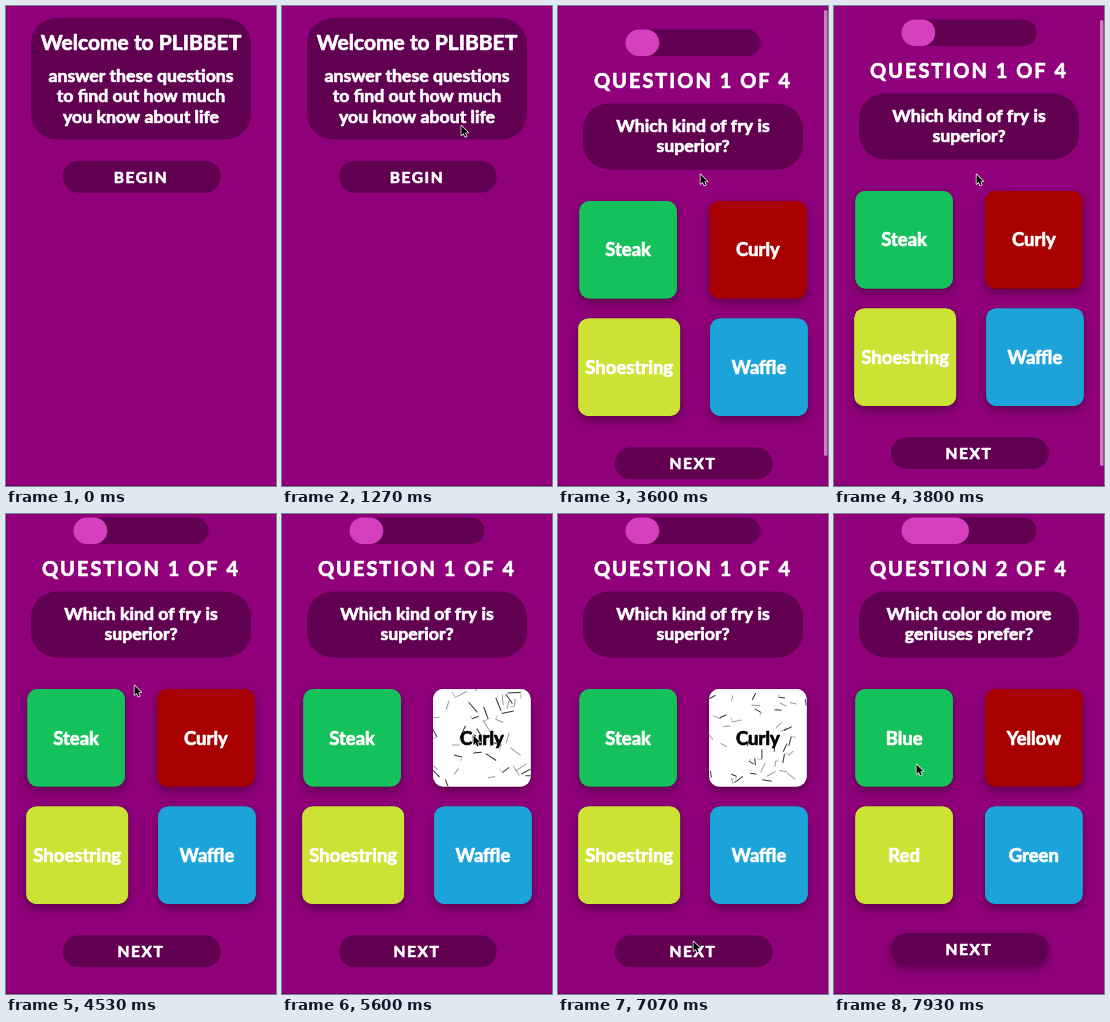
Animation of 270x480 px, one loop 8 s. Source, as an HTML page with a canvas:

```html
<!DOCTYPE html>
<html lang="en">
<head>
<meta charset="utf-8">
<title>Quiz</title>
<style>
  html, body { margin: 0; width: 100%; height: 100%; overflow: hidden; background: #8f007a; }
  canvas { display: block; width: 270px; height: 480px; }
</style>
</head>
<body>
<canvas id="stage" width="270" height="480"></canvas>
<script>
const ctx = document.getElementById('stage').getContext('2d');
const W = 270, H = 480, MID = W / 2, LOOP = 8000;
const BEGIN_CLICK = 2670, PICK = 5130, NEXT_CLICK = 7470;
const BG = '#8f007a', DARK = '#610050', PINK = '#d63fc0';
const COLORS = ['#14c15a', '#a80000', '#cce335', '#1ca4da'];
const CARD = 97.5, GRID = 259.5;

const QUESTIONS = [
  { lines: ['Which kind of fry is', 'superior?'],
    answers: ['Steak', 'Curly', 'Shoestring', 'Waffle'] },
  { lines: ['Which color do more', 'geniuses prefer?'],
    answers: ['Blue', 'Yellow', 'Red', 'Green'] }
];

const ENTER = { time: 600, x: 244, y: 33 };
const MOVES = [
  { from: 600, to: 1730, x: 142, y: 168 },
  { from: 4270, to: 4530, x: 128, y: 171 },
  { from: 4530, to: 5070, x: 191, y: 221 },
  { from: 6000, to: 6800, x: 135, y: 427 },
  { from: 7700, to: 7930, x: 82, y: 250 }
];

const clamp = v => Math.max(0, Math.min(1, v));
const ease = p => p * p * (3 - 2 * p);
const progress = (t, a, b) => ease(clamp((t - a) / (b - a)));
const mix = (a, b, p) => a + (b - a) * p;

function seeded(seed) {
  return () => (seed = (seed * 16807) % 2147483647) / 2147483647;
}

const rnd = seeded(4217);
const sticks = Array.from({ length: 44 }, () => ({
  x: rnd(), y: rnd(), angle: rnd() * Math.PI, spin: (rnd() - 0.5) * 2.4,
  fall: 0.1 + rnd() * 0.2, size: 7 + rnd() * 7,
  shade: rnd() < 0.5 ? '#333' : '#999', bent: rnd() < 0.4
}));

function box(x, y, w, h, r, color) {
  ctx.fillStyle = color;
  ctx.beginPath();
  ctx.roundRect(x, y, w, h, r);
  ctx.fill();
}

// A tight and a wide layer of shade
function raisedBox(x, y, w, h, r, color, strength = 1) {
  ctx.save();
  for (const k of [1, 2]) {
    ctx.shadowColor = `rgba(0,0,0,${0.2 * strength})`;
    ctx.shadowBlur = 6 * k;
    ctx.shadowOffsetY = 1 + 2 * k;
    box(x, y, w, h, r, color);
  }
  ctx.restore();
}

function setFont(size, gap = 0) {
  ctx.font = `bold ${size}px Lato, "Noto Sans", sans-serif`;
  ctx.letterSpacing = gap + 'px';
  ctx.textAlign = 'center';
}

// The outline thickens the strokes
function text(str, x, y, size, gap = 0, color = '#fff') {
  setFont(size, gap);
  ctx.fillStyle = ctx.strokeStyle = color;
  ctx.lineWidth = 0.7;
  ctx.lineJoin = 'round';
  ctx.strokeText(str, x, y);
  ctx.fillText(str, x, y);
}

function paragraph(lines, y) {
  lines.forEach((line, i) => text(line, MID, y + i * 20.4, 17.7));
}

function button(label, y, lift = 0) {
  raisedBox(57, y - 2 * lift, 157.5, 31.5, 15.75, DARK, lift);
  text(label, MID, y + 21.5 - 2 * lift, 15.5, 1.6);
}

function drawWelcome() {
  box(25, 12, 220, 121.5, 26, DARK);
  text('Welcome to PLIBBET', MID, 44, 21);
  paragraph(['answer these questions', 'to find out how much', 'you know about life'], 76);
  button('BEGIN', 155);
}

function drawSticks(x, y, w, h, t) {
  const s = (t - PICK) / 1000;
  const scale = mix(1, 0.75, progress(t, 5600, 7070));
  ctx.save();
  ctx.beginPath();
  ctx.roundRect(x, y, w, h, 10);
  ctx.clip();
  ctx.lineWidth = 1;
  const line = (x0, y0, x1, y1, color) => {
    ctx.strokeStyle = color;
    ctx.beginPath();
    ctx.moveTo(x0, y0);
    ctx.lineTo(x1, y1);
    ctx.stroke();
  };
  for (const k of sticks) {
    const half = k.size * scale / 2;
    ctx.save();
    ctx.translate(x + k.x * w, y - 10 + (k.y + k.fall * s) % 1 * (h + 20));
    ctx.rotate(k.angle + k.spin * s);
    line(-half, 0, half, 0, k.shade);
    if (k.bent) line(half, 0, half, half, '#bbb');
    ctx.restore();
  }
  ctx.restore();
}

function drawCard(label, x, y, w, color, picked, t) {
  raisedBox(x, y, w, CARD, 10, picked ? '#fff' : color);
  if (picked) drawSticks(x, y, w, CARD, t);
  text(label, x + w / 2, y + 55.5, 18.5, 0, picked ? '#000' : '#fff');
}

// Cards grow with their label; the free room goes around them evenly
function drawCards(answers, pick, t) {
  setFont(18.5);
  const widths = answers.map(a => Math.max(CARD, ctx.measureText(a).width + 14));
  for (let row = 0; row < 2; row++) {
    const first = row * 2;
    const margin = (GRID - widths[first] - widths[first + 1]) / 4;
    let x = (W - GRID) / 2 + margin;
    for (let i = first; i < first + 2; i++) {
      drawCard(answers[i], x, 195 + row * 117.5, widths[i], COLORS[i], i === pick, t);
      x += widths[i] + 2 * margin;
    }
  }
}

function drawQuestion(t) {
  const index = t < NEXT_CLICK ? 0 : 1;
  const { lines, answers } = QUESTIONS[index];
  const change = progress(t, NEXT_CLICK, NEXT_CLICK + 200);
  const scroll = 20 * progress(t, 3600, 4000);

  ctx.save();
  ctx.translate(0, -scroll);
  box(67.5, 23.5, 135, 26.5, 13.25, DARK);
  box(67.5, 23.5, 33.75 * (1 + change), 26.5, 13.25, PINK);
  text(`QUESTION ${index + 1} OF 4`, MID, 82, 20, 2);
  box(25, 97.5, 220, 66, 26, DARK);
  paragraph(lines, 126);
  drawCards(answers, index === 0 && t >= PICK ? 1 : -1, t);
  button('NEXT', 441.5, change);
  ctx.restore();

  if (t >= 3600) {
    ctx.globalAlpha = 1 - progress(t, 4270, 4470);
    box(266, 4 + scroll, 3.5, 446, 1.75, '#c583bb');
    ctx.globalAlpha = 1;
  }
}

function drawPointer(t) {
  if (t < ENTER.time) return;
  let { x, y } = ENTER;
  for (const m of MOVES) {
    const p = progress(t, m.from, m.to);
    x = mix(x, m.x, p);
    y = mix(y, m.y, p);
  }
  ctx.save();
  ctx.translate(x, y);
  const arrow = new Path2D('M.5 .5V10L2.7 8L4.2 11.5L5.8 10.8L4.3 7.4L7.2 7.2Z');
  ctx.lineJoin = 'round';
  ctx.lineWidth = 1.4;
  ctx.strokeStyle = '#fff';
  ctx.stroke(arrow);
  ctx.fillStyle = '#000';
  ctx.fill(arrow);
  ctx.restore();
}

function draw() {
  const t = performance.now() % LOOP;
  ctx.fillStyle = BG;
  ctx.fillRect(0, 0, W, H);
  if (t < BEGIN_CLICK) drawWelcome();
  else drawQuestion(t);
  ctx.fillStyle = '#760065';
  ctx.fillRect(0, H - 1, W, 1);
  drawPointer(t);
  requestAnimationFrame(draw);
}
draw();
</script>
</body>
</html>
```
